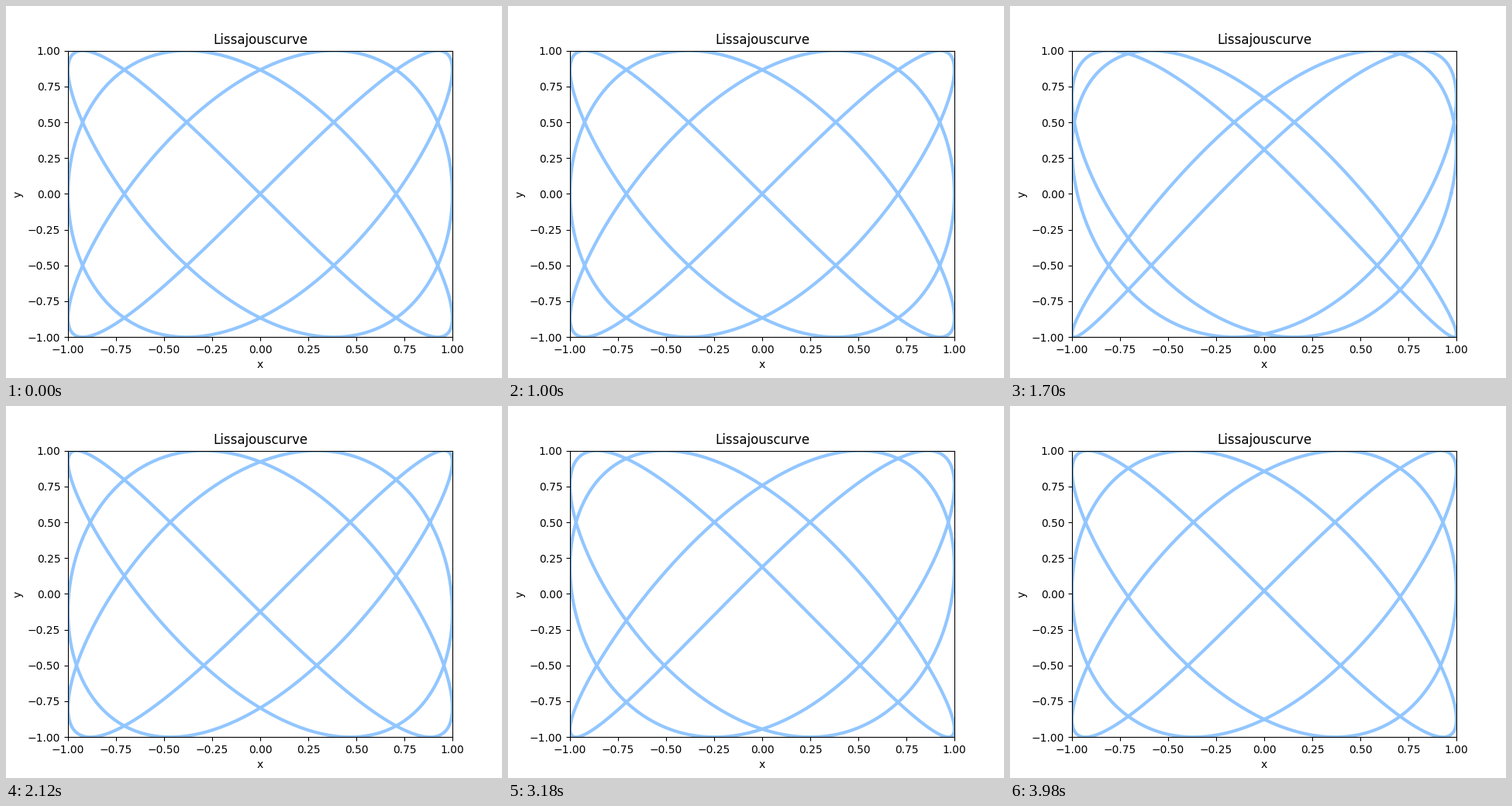
Animation of 640 by 480 pixels, one loop 4000 ms. Source, as a matplotlib script:

```python
import matplotlib.pyplot as plt
import numpy as np
from matplotlib.animation import FuncAnimation

FRAMES = 200
INTERVAL = 20

t = np.linspace(0, 2 * np.pi, 1000)

fig, ax = plt.subplots(figsize=(6.4, 4.8), dpi=100)
ax.set_xlim(-1, 1)
ax.set_ylim(-1, 1)
ax.set_title("Lissajouscurve")
ax.set_xlabel("x")
ax.set_ylabel("y")
curve, = ax.plot([], [], color="#92C6FF", lw=3)


def update(i):
    # The phase of x advances by half a turn per loop, which closes the cycle.
    phase = np.pi * i / FRAMES
    curve.set_data(np.sin(3 * t + phase), np.sin(4 * t))
    return curve,


anim = FuncAnimation(fig, update, frames=FRAMES, interval=INTERVAL,
                     repeat=True, repeat_delay=0, blit=False)
plt.show()
```
